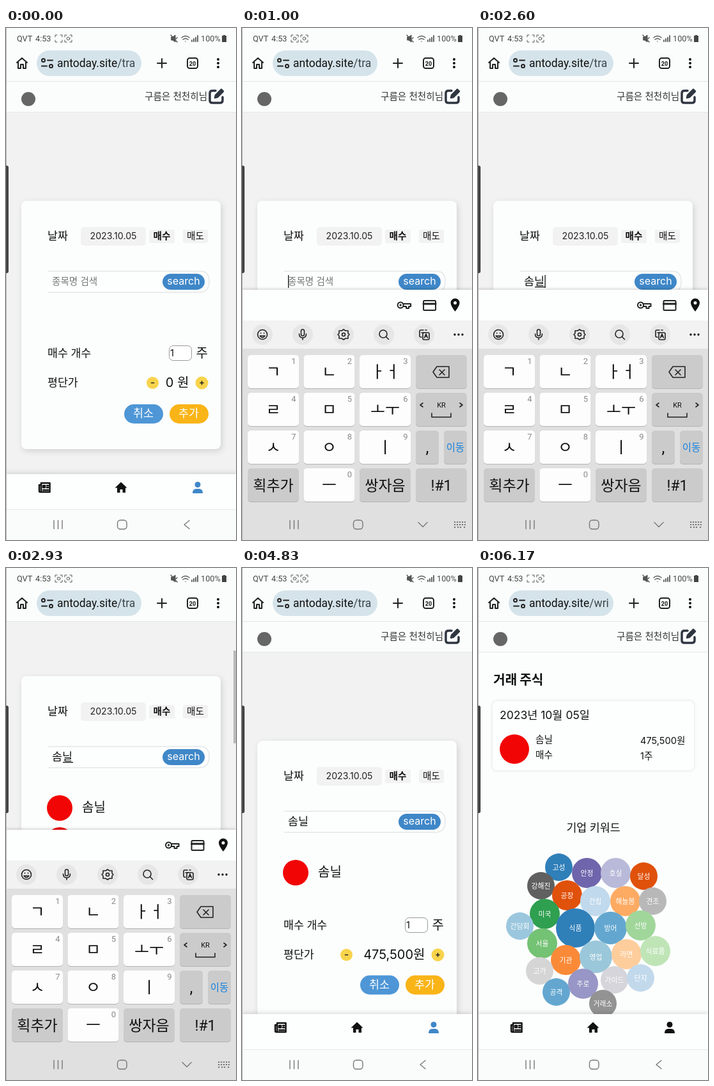
Recreate the animation shown at these times as an HTML page. Size 360 by 800 pixels, loop 6.21 s.

```html
<!DOCTYPE html>
<html lang="ko">
<head>
<meta charset="utf-8">
<title>Stock diary</title>
<style>
html, body { margin: 0; width: 100%; height: 100%; overflow: hidden; background: #f2f2f2; }
svg { display: block; width: 100vw; height: 100vh; font-family: Inter, "Noto Sans CJK KR", "Noto Sans CJK JP", "Noto Sans CJK", sans-serif; fill: #111; }
.line { fill: none; stroke: #222; stroke-width: 2; stroke-linecap: round; stroke-linejoin: round; }
.nav { stroke: #777; stroke-width: 1.4; }
.key { stroke-width: 1.6; }
.mid { text-anchor: middle; }
.ui { font-family: Roboto, "Noto Sans CJK KR", "Noto Sans CJK JP", sans-serif; }
.body { font-size: 17.3px; font-weight: 500; }
.small { font-size: 14.6px; }
.big { font-size: 20px; }
.soft { filter: drop-shadow(2px 3px 5px #0002); }
.paper { fill: #fcfdfd; }
.grey { fill: #f2f2f2; }
</style>
</head>
<body>
<svg viewBox="0 0 360 800">
  <rect class="grey" width="360" height="800"/>

  <g id="form">
    <rect id="card" class="paper soft" x="24" y="270" width="312" rx="8"/>
    <text class="body" x="65" y="331">날짜</text>
    <rect class="grey" x="117" y="311" width="102" height="29" rx="5"/>
    <text class="mid" x="168" y="330" font-size="14.2" fill="#222">2023.10.05</text>
    <rect class="grey" x="224" y="315" width="40" height="21" rx="3"/>
    <text class="small mid" x="244" y="330" font-weight="900">매수</text>
    <rect class="grey" x="277" y="315" width="39" height="21" rx="3"/>
    <text class="small mid" x="296.500" y="330" font-weight="500">매도</text>
    <path d="M66 380H304Q318 380 318 396T304 413H66" fill="#fdfefe" stroke="#e5e7e7" stroke-width="1.500"/>
    <rect x="245" y="384" width="66" height="25" rx="12.500" fill="#3f87c8"/>
    <text class="mid" x="278" y="401" font-size="16" fill="#fff">search</text>
    <text id="query" x="72"/>
    <rect id="underline" y="404" width="16" height="1.300"/>
    <rect id="caret" y="386" width="1.300" height="20"/>
    <g id="found">
      <circle cx="84" cy="476" r="20" fill="#f20505"/>
      <text class="big" x="119" y="482" font-weight="500">솜닐</text>
      <circle id="second" cx="84" cy="526" r="20" fill="#f20505"/>
    </g>
    <g id="order">
      <text class="body" x="65" y="514">매수 개수</text>
      <rect x="255.500" y="496.500" width="35" height="23" rx="6" fill="#fff" stroke="#999"/>
      <text class="small" x="257" y="513">1</text>
      <text class="big" x="297.500" y="515" font-weight="500">주</text>
      <text class="body" x="65" y="560">평단가</text>
      <g id="minus"><circle cx="229.500" cy="554.500" r="9.500" fill="#f8d44c"/><path class="line key" d="M227.500 554.500h4"/></g>
      <circle cx="306.500" cy="554.500" r="10" fill="#f8d44c"/><path class="line key" d="M304 554.500h5m-2.500-2.500v5"/>
      <text id="price" class="big" x="286.500" y="561" text-anchor="end"/>
      <g id="buttons" class="mid" font-size="17.400">
        <rect x="185" y="588" width="61" height="30" rx="15" fill="#4e96d6"/>
        <text x="215" y="608" fill="#fff">취소</text>
        <rect x="256" y="588" width="61" height="30" rx="15" fill="#f9b417"/>
        <text x="286" y="608" fill="#fff">추가</text>
      </g>
    </g>
  </g>

  <g id="diary">
    <rect class="paper" y="84" width="360" height="616"/>
    <text x="24" y="182" font-size="20.200" font-weight="900">거래 주식</text>
    <rect x="23" y="208" width="315" height="108" rx="7" fill="#fdfefe" style="filter:drop-shadow(0 0 2.5px #0002)"/>
    <text x="34" y="236" font-size="17.500">2023년 10월 05일</text>
    <circle cx="57" cy="283" r="23" fill="#f20505"/>
    <text class="small" x="90" y="273">솜닐</text>
    <text class="small" x="90" y="297">매수</text>
    <text class="small" x="254" y="275">475,500원</text>
    <text class="small" x="254" y="299">1주</text>
    <text class="body mid" x="180.500" y="412">기업 키워드</text>
    <g id="bubbles" class="mid"></g>
  </g>

  <g id="header">
    <rect fill="#fbfdfd" y="80" width="360" height="51"/>
    <rect fill="#e6e9e9" y="131" width="360" height="1"/>
    <circle cx="35" cy="111" r="11" fill="#666"/>
    <text class="small" x="217" y="111.500" fill="#333">구름은 천천히님</text>
    <g class="line" style="stroke:#2f3640;stroke-width:3.500">
      <path d="M328 98h-5q-4 0-4 4v11q0 4 4 4h12q4 0 4-4v-5"/>
      <path d="M327 109l1-4 9-9 3 3-9 9z" fill="#2f3640" style="stroke-width:2.500"/>
    </g>
  </g>

  <rect id="thumb" x="356" width="4" height="145" fill="#bbb"/>

  <g>
    <rect fill="#fbfdfd" width="360" height="83"/>
    <rect fill="#e3e6e6" y="83" width="360" height="1"/>
    <g class="ui" font-size="12.700" fill="#444">
      <text x="17" y="21">QVT</text>
      <text x="46" y="21">4:53</text>
      <text x="305" y="21">100%</text>
    </g>
    <g class="line" style="stroke:#555;stroke-width:1">
      <path d="M77 14v-3h3m5 0h3v3m0 5v3h-3m-5 0h-3v-3M92 14v-3h3m5 0h3v3m0 5v3h-3m-5 0h-3v-3"/>
      <circle id="scan" cx="82.500" cy="16.500" r="2.300"/>
      <circle cx="97.500" cy="16.500" r="2.300"/>
      <path d="M259 14h2l4-3v11l-4-3h-2z" fill="#555"/>
      <path d="M258 11l10 11m0-7l-2 2M275 15q6-5 12 0m-10 3q4-3 8 0m-4 3v0" stroke-width="1.400"/>
      <path d="M291 21v-2m3 2v-4m3 4v-6m3 6v-9" style="stroke-width:1.800"/>
    </g>
    <path d="M338 12h2v-1h3v1h2v10h-7z" fill="#444"/>
    <path class="line" d="M17 54l8-7 8 7m-14-1v10h4v-6h4v6h4v-10"/>
    <rect x="48" y="35" width="164" height="40" rx="20" fill="#d5e4ea"/>
    <g class="line"><circle cx="58.500" cy="50.500" r="2.500"/><path d="M65 50.500h8M56 59.500h8"/><circle cx="70.500" cy="59.500" r="2.500"/></g>
    <text class="ui" x="80" y="61" font-size="17.500">antoday.site<tspan id="path" fill="#3c474c"></tspan></text>
    <path class="line" d="M237 55h14m-7-7v14"/>
    <rect class="line" x="284" y="47" width="16" height="16" rx="3.500"/>
    <text class="ui mid" x="292" y="58.500" font-size="9" font-weight="700">20</text>
    <circle cx="332" cy="49" r="2"/><circle cx="332" cy="55" r="2"/><circle cx="332" cy="61" r="2"/>
  </g>

  <g>
    <rect y="697" width="360" height="56" fill="#fdfefe" style="filter:drop-shadow(0 -2px 3px #0002)"/>
    <path class="line" style="stroke:#111;stroke-width:2.500" d="M55.500 711h13v14h-15q-1.500 0-1.500-2v-9h3m0-3v12m3-8h3v3h-3zm6 0h2m-2 3h2m-8 4h8"/>
    <path d="M170.500 718.500l9.500-9 9.500 9h-2.500v7.500h-4.500v-5h-4v5h-4.500v-7.500z"/>
    <g id="person"><circle cx="300" cy="713.500" r="4.500"/><path d="M292 727q0-7 6-7h4q6 0 6 7z"/></g>
  </g>

  <g id="keyboard">
    <rect y="409" width="360" height="50" fill="#fdfefe" style="filter:drop-shadow(0 -1px 2px #0003)"/>
    <g id="autofill">
      <g class="line"><circle cx="248" cy="433" r="4.500"/><path d="M253 431h11v4h-3v3h-4v-3h-4"/><circle cx="248" cy="433" r=".7"/>
        <rect x="284" y="426" width="19" height="15" rx="1.500"/><path d="M284 431h19" style="stroke-width:3"/></g>
      <path d="M333.500 443q-7-9-7-13.500a7 7 0 0 1 14 0q0 4.500-7 13.500zm0-11a2.500 2.500 0 1 0 0-5 2.500 2.500 0 0 0 0 5z" fill-rule="evenodd"/>
    </g>
    <rect y="457" width="360" height="44" fill="#f2f2f2"/>
    <rect y="501" width="360" height="300" fill="#e0e0e0"/>
    <g id="tools" fill="#e6e6e6"></g>
    <g class="line key">
      <circle cx="32" cy="479" r="7.500"/><path d="M28 481q4 5 8 0zM29.500 476.500v.5m5-.5v.5"/>
      <rect x="92.500" y="471" width="5" height="10" rx="2.500"/><path d="M89.500 478q0 6 5.500 6t5.500-6m-5.500 6v3"/>
      <path d="M159 471l3 2 4 0 0 4 2 2-2 2 0 4-4 0-3 2-3-2-4 0 0-4-2-2 2-2 0-4 4 0z"/><circle cx="159" cy="479" r="2.500"/>
      <circle cx="221" cy="478" r="6"/><path d="M225.500 482.500l4 4"/>
      <path d="M284 472h-4q-2 0-2 2v7q0 2 2 2h1m6-11h2M281 476h4"/><rect x="283" y="476" width="10" height="11" rx="2"/><path d="M285.500 484l2.500-6 2.500 6m-4-2h3"/>
    </g>
    <circle cx="333" cy="479" r="1.700"/><circle cx="339" cy="479" r="1.700"/><circle cx="345" cy="479" r="1.700"/>
    <g id="keys" class="ui mid"></g>
    <g class="line key">
      <path d="M305 529h19v17h-19l-6-8.500zM309 534l8 8m0-8l-8 8M283 586l-4 3 4 3M341 586l4 3-4 3M297 602v6h30v-6"/>
    </g>
    <text class="ui mid" x="312" y="593" font-size="11">KR</text>
  </g>

  <g>
    <rect id="system" y="752" width="360" height="48"/>
    <rect id="divider" y="752" width="360" height="1" fill="#e8eaea"/>
    <path class="line nav" d="M75 769.500v13m6.500-13v13m6.500-13v13"/>
    <rect class="line nav" x="174.500" y="769" width="14.500" height="14" rx="4.500"/>
    <path id="back" class="line nav" d="M287 769.500l-8 6.500 8 6.500"/>
    <g id="down"><path class="line nav" d="M276 772.500l7 7 7-7"/><path d="M332 772h18m-18 4h18m-18 4h3m2 0h8m2 0h3" stroke="#777" stroke-width="2" stroke-dasharray="2.200 1.800"/></g>
  </g>
  <rect width="1" height="800" fill="#b5b5b5"/>
  <rect x="-4" y="215" width="8" height="168" rx="3" fill="#444"/>
</svg>
<script>
const LOOP = 6210;
const FOCUS = 720, SUBMIT = 2600, PICK = 3250, PRICE = 3930, SAVE = 4960, CHART = 5200;
const strokes = [[1340, 'ㅅ'], [1560, '소'], [1800, '솜'], [2050, '솜ㄴ'], [2280, '솜니'], [2400, '솜닐']];

const el = {};
document.querySelectorAll('[id]').forEach(node => el[node.id] = node);
const show = (node, on) => node.style.display = on ? '' : 'none';
const set = (node, attrs) => { for (const name in attrs) node.setAttribute(name, attrs[name]); };
const move = (node, x, y) => set(node, { transform: `translate(${x} ${y})` });
const ease = (t, from, to) => 1 - (1 - Math.min(1, Math.max(0, (t - from) / (to - from)))) ** 3;

el.tools.innerHTML = [32, 95, 159, 222, 285].map(x => `<circle cx="${x}" cy="479" r="16"/>`).join('');

function key(x, y, width, label, { size = 25, hint = '', fill = '#fdfdfd', ink = '#111' } = {}) {
  return `<rect x="${x}" y="${y}" width="${width}" height="52" rx="5" fill="${fill}" style="filter:drop-shadow(0 1px .5px #0003)"/>
    <text x="${x + width / 2}" y="${y + 26 + size * .37}" font-size="${size}" fill="${ink}">${label}</text>
    <text x="${x + width - 8}" y="${y + 14}" font-size="13" fill="#8a8a8a">${hint}</text>`;
}
const dark = '#cbcbcb';
const letters = ['ㄱ', 'ㄴ', 'ㅏㅓ', 'ㄹ', 'ㅁ', 'ㅗㅜ', 'ㅅ', 'ㅇ', 'ㅣ'];
el.keys.innerHTML = letters.map((label, i) =>
  key(9 + i % 3 * 87.5, 511 + Math.floor(i / 3) * 59, 80, label, { hint: i + 1 })).join('')
  + key(9, 688, 80, '획추가', { size: 23, fill: dark })
  + key(96.5, 688, 80, 'ㅡ', { hint: 0 })
  + key(184, 688, 80, '쌍자음', { size: 23, fill: dark })
  + key(272, 511, 80, '', { fill: dark })
  + key(272, 570, 80, '', { fill: dark })
  + key(272, 629, 36, ',', { fill: dark })
  + key(316, 629, 36, '이동', { size: 15.5, fill: dark, ink: '#1683e0' })
  + key(272, 688, 80, '!#1', { size: 23, fill: dark });

const keywords = `고성 126 467 21 2f7fb9|안정 170 476 23 6f65ac|호실 215 476 23 b9b9d9|달성 259 481 21 e0510b
|강해진 98 496 21 606060|공장 139 511 23 e0510b|건립 183 520 23 c0d9ec|해늘봄 230 520 23 fdab63
|견조 273 520 21 b8b8b8|미국 104 540 23 2f9f50|간담회 65 559 21 9bc7de|식품 152 562 30 2f7fb9
|방어 207 562 25 63a7d0|선방 254 558 23 a0d69a|서울 100 586 23 74c274|기관 137 612 23 fa8a38
|영업 184 607 25 9bc7da|라면 232 603 23 fdcd9c|식료품 277 598 23 bfe5b7|고가 96 629 21 d5d5d5
|공격 122 662 21 63a7d0|주로 164 649 23 9796c6|가이드 213 643 21 d5d5db|단지 254 640 21 c2d9ec
|거래소 195 680 21 939393`;
el.bubbles.innerHTML = keywords.split('|').map(item => {
  const [word, x, y, r, color] = item.trim().split(' ');
  return `<circle cx="${+x + .5}" cy="${+y + .5}" r="${+r + .5}" fill="#${color}"/>
    <text x="${+x + .5}" y="${+y + 5}" font-size="10.800" fill="#fff">${word}</text>`;
}).join('');

function drawQuery(t) {
  const [since, text] = strokes.filter(([at]) => at <= t).pop() || [FOCUS, ''];
  const focused = t >= FOCUS && t < PICK;
  el.query.textContent = text || '종목명 검색';
  set(el.query, text ? { y: 401.5, 'font-size': 17.4, fill: '#111' } : { y: 401, 'font-size': 14.6, fill: '#777' });
  set(el.underline, { x: 73 + 16 * (text.length - 1) });
  set(el.caret, { x: 72 + 16.2 * text.length });
  show(el.underline, focused && text);
  show(el.caret, focused && (t - since) % 1000 < 500);
}

function drawForm(t) {
  const found = t >= SUBMIT, listing = found && t < PICK, priced = t >= PRICE;
  show(el.found, found);
  show(el.second, listing);
  set(el.card, { height: listing ? 500 : found ? 438 : 388 });
  move(el.order, 0, listing ? 100 : found ? 50 : 0);
  move(el.minus, priced ? -66 : 0, 0);
  move(el.buttons, 0, priced ? -1.5 : 0);
  el.price.textContent = priced ? '475,500원' : '0 원';
}

function draw(t) {
  const scroll = 101 * (ease(t, 2660, 2900) - ease(t, 3260, 3460));
  const keyboard = ease(t, 720, 980) - ease(t, 3270, 3490);
  const saved = t >= SAVE;

  drawQuery(t);
  drawForm(t);
  move(el.form, 0, -scroll);
  move(el.header, 0, -scroll);
  set(el.thumb, { y: 84 + scroll * .445 });
  show(el.thumb, t > 2660 && t < 3400);

  show(el.diary, saved);
  show(el.bubbles, t >= CHART);
  el.path.textContent = saved ? '/wri' : '/tra';
  set(el.person, { fill: saved ? '#111' : '#3f87c8' });

  const open = keyboard > .4;
  move(el.keyboard, 0, 391 * (1 - keyboard));
  show(el.keyboard, keyboard > .001);
  move(el.autofill, 6.5 * ease(t, 1000, 1230), 0);
  set(el.system, { fill: open ? '#e0e0e0' : '#fafcfc' });
  show(el.divider, !open);
  show(el.back, !open);
  show(el.down, open);

  show(el.scan, (t + 400) % 890 >= 445);
}

function tick() {
  draw(performance.now() % LOOP);
  requestAnimationFrame(tick);
}
tick();
</script>
</body>
</html>
```
